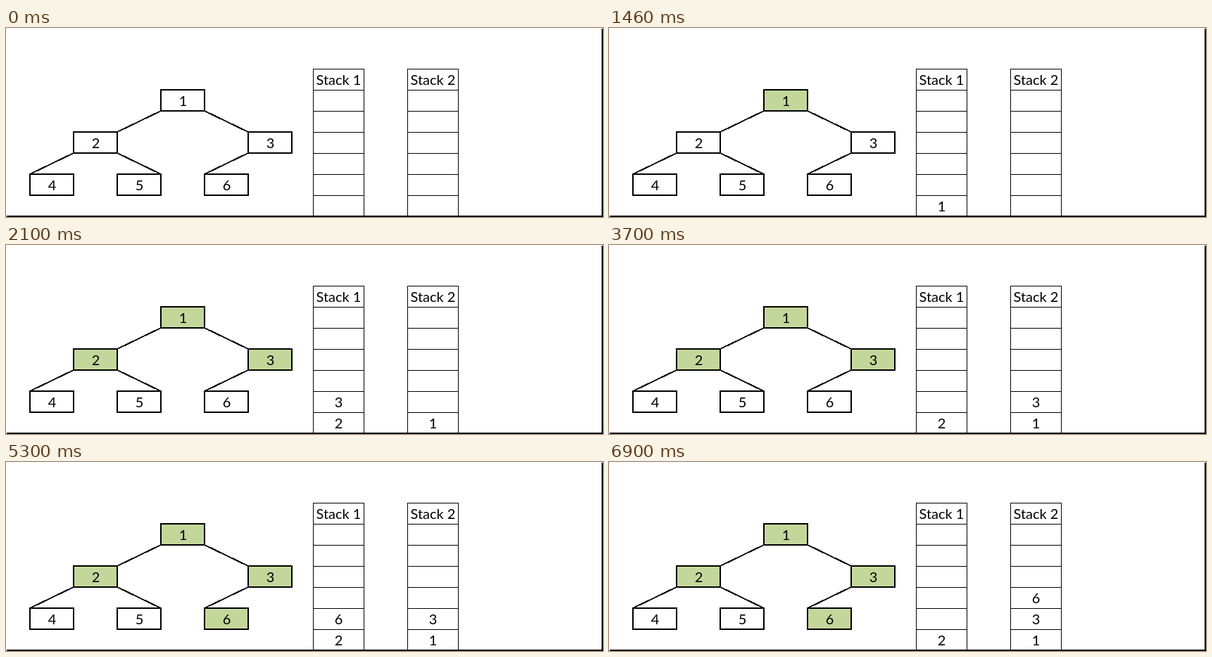
These frames come from a looping animation (848x269 px, 8 s). An HTML page:

```html
<!DOCTYPE html>
<html lang="en">
<head>
<meta charset="utf-8">
<title>Tree traversal with two stacks</title>
<style>
  html, body { margin: 0; width: 100%; height: 100%; overflow: hidden; background: #fff; }
  svg { display: block; }
  text { font: 20px Carlito, Lato, "Open Sans", sans-serif; text-anchor: middle; fill: #000; }
  .box, .edges, .grid { fill: none; stroke: #000; shape-rendering: crispEdges; }
  .box, .edges { stroke-width: 2; }
  .mark { fill: #c4d79b; }

  /* Each step is a hard cut; "from" parts stay until the loop ends. */
  [class*="from"], [class*="only"] { animation: 8s step-end infinite; }
  .from1 { animation-name: from1; }
  .from2 { animation-name: from2; }
  .from3 { animation-name: from3; }
  .from4 { animation-name: from4; }
  .from5 { animation-name: from5; }
  .only1 { animation-name: only1; }
  .only2 { animation-name: only2; }
  .only4 { animation-name: only4; }
  @keyframes from1 { 0% { opacity: 0 } 6.25%, 100% { opacity: 1 } }
  @keyframes from2 { 0% { opacity: 0 } 26.25%, 100% { opacity: 1 } }
  @keyframes from3 { 0% { opacity: 0 } 46.25%, 100% { opacity: 1 } }
  @keyframes from4 { 0% { opacity: 0 } 66.25%, 100% { opacity: 1 } }
  @keyframes from5 { 0% { opacity: 0 } 86.25%, 100% { opacity: 1 } }
  @keyframes only1 { 0%, 26.25%, 100% { opacity: 0 } 6.25% { opacity: 1 } }
  @keyframes only2 { 0%, 46.25%, 100% { opacity: 0 } 26.25% { opacity: 1 } }
  @keyframes only4 { 0%, 86.25%, 100% { opacity: 0 } 66.25% { opacity: 1 } }
</style>
</head>
<body>
<svg width="848" height="269" viewBox="0 0 848 269">
  <defs>
    <rect id="node" width="62" height="30"/>
    <path id="stack" d="M.5 .5V210M72.5 .5V210M0 .5H73M0 30.5H73M0 60.5H73M0 90.5H73M0 120.5H73M0 150.5H73M0 180.5H73"/>
  </defs>

  <g class="mark">
    <use class="from1" href="#node" x="220" y="88"/>
    <use class="from2" href="#node" x="96" y="148"/>
    <use class="from2" href="#node" x="344" y="148"/>
    <use class="from4" href="#node" x="282" y="208"/>
  </g>

  <path class="edges" d="M220 118L158 148M282 118L344 148M96 178L34 208M158 178L220 208M344 178L282 208"/>
  <g class="box">
    <use href="#node" x="220" y="88"/>
    <use href="#node" x="96" y="148"/>
    <use href="#node" x="344" y="148"/>
    <use href="#node" x="34" y="208"/>
    <use href="#node" x="158" y="208"/>
    <use href="#node" x="282" y="208"/>
  </g>
  <text x="251.5" y="111">1</text>
  <text x="127.5" y="171">2</text>
  <text x="375.5" y="171">3</text>
  <text x="65.5" y="231">4</text>
  <text x="189.5" y="231">5</text>
  <text x="313.5" y="231">6</text>

  <g class="grid">
    <use href="#stack" x="436" y="58"/>
    <use href="#stack" x="570" y="58"/>
  </g>
  <text x="472.5" y="81">Stack 1</text>
  <text x="606.5" y="81">Stack 2</text>

  <text class="only1" x="472.5" y="261">1</text>
  <text class="from2" x="472.5" y="261">2</text>
  <text class="only2" x="472.5" y="231">3</text>
  <text class="only4" x="472.5" y="231">6</text>

  <text class="from2" x="606.5" y="261">1</text>
  <text class="from3" x="606.5" y="231">3</text>
  <text class="from5" x="606.5" y="201">6</text>

  <path class="edges" d="M1 268H848M847 1V269"/>
</svg>
</body>
</html>
```
